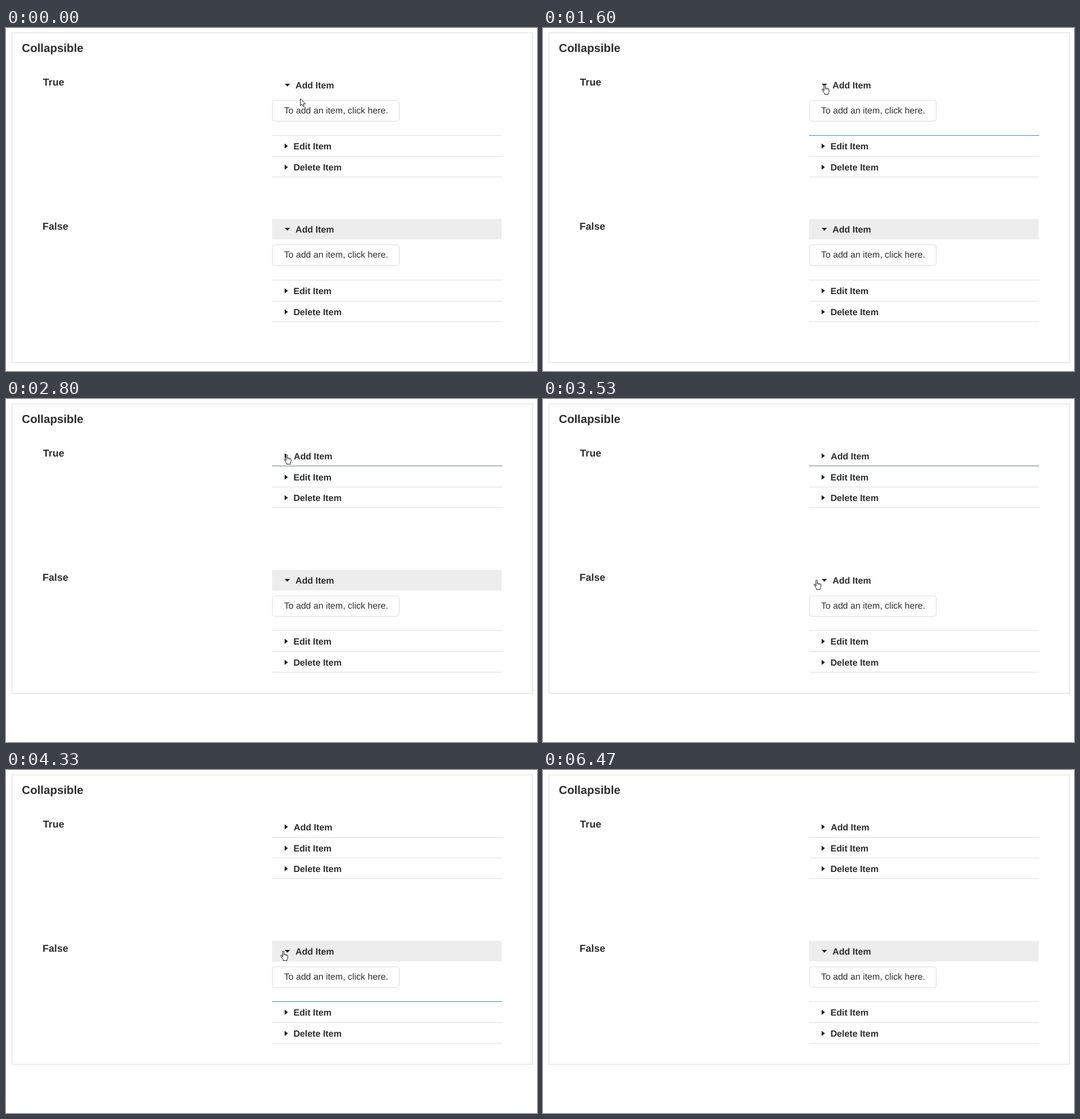
These frames come from a looping animation (930x602 px, 6540 ms). An HTML page:

```html
<!DOCTYPE html>
<html lang="en">
<head>
<meta charset="utf-8">
<title>Collapsible</title>
<style>
  html, body { margin: 0; width: 100%; height: 100%; overflow: hidden; background: #fff; }
  svg { display: block; }
  text { font: 700 15.8px "Liberation Sans", Arial, sans-serif; fill: #2c2c2c; text-rendering: geometricPrecision; }
  .title { font-size: 20.2px; }
  .label { font-size: 17.6px; }
  .note { font-weight: 400; font-size: 15.7px; fill: #303030; }
  .box { fill: #fff; stroke: #dcdcdc; }
  .line { fill: #dedede; }
  .cursor { fill: #fff; stroke: #1c1c1c; stroke-linejoin: round; stroke-linecap: round; }
</style>
</head>
<body>
<svg id="stage" width="930" height="602" viewBox="0 0 930 602"></svg>
<script>
const LOOP = 6540, TICK = 200 / 3, FOLD = 70.7;
const CLICK_TOP = 1600, CLICK_LOW = 4200, BLUR = 6466, EXIT = 5590;
const BLUE = '#3c8bc2', GREY = '#dedede';
const DOWN = 'M488 97.8H497.6L492.8 102.8Z';
const RIGHT = 'M488 95.2L493.8 99.7L488 104.2Z';
const stage = document.getElementById('stage');

function add(parent, tag, attrs, text) {
  const el = document.createElementNS('http://www.w3.org/2000/svg', tag);
  for (const key in attrs) el.setAttribute(key, attrs[key]);
  if (text) el.textContent = text;
  return parent.appendChild(el);
}

const set = (el, key, value) => el.setAttribute(key, value);
const moveTo = (el, x, y) => set(el, 'transform', `translate(${x} ${y})`);

// Piecewise linear value of column col in rows that start with a time.
function track(keys, t, col = 1) {
  if (t <= keys[0][0]) return keys[0][col];
  for (let i = 1; i < keys.length; i++) {
    const a = keys[i - 1], b = keys[i];
    if (t <= b[0]) return a[col] + (b[col] - a[col]) * (t - a[0]) / (b[0] - a[0]);
  }
  return keys[keys.length - 1][col];
}

const card = add(stage, 'rect', { x: 10.5, y: 8.5, width: 912, height: 579, class: 'box' });
add(stage, 'text', { x: 27.8, y: 42, class: 'title' }, 'Collapsible');
add(stage, 'text', { x: 64.8, y: 101, class: 'label' }, 'True');
const lowLabel = add(stage, 'text', { x: 64, y: 354, class: 'label' }, 'False');

const clip = add(add(stage, 'clipPath', { id: 'fold' }), 'rect', { x: 460, y: 118, width: 420, height: 70 });

// Positions inside a panel are those of the upper one.
function makePanel(clipped) {
  const head = add(stage, 'g', {});
  const bg = add(head, 'rect', { x: 466, y: 82, width: 402, height: 36, fill: '#fff' });
  const icon = add(head, 'path', { d: DOWN, fill: '#222' });
  const name = add(head, 'text', { x: 507, y: 105.6 }, 'Add Item');
  const wrap = add(stage, 'g', clipped ? { 'clip-path': 'url(#fold)' } : {});
  const body = add(wrap, 'g', {});
  add(body, 'rect', { x: 466.5, y: 127.5, width: 222, height: 36, rx: 4, class: 'box' });
  add(body, 'text', { x: 487, y: 150, class: 'note' }, 'To add an item, click here.');
  const rows = ['Edit Item', 'Delete Item'].map((text, i) => {
    const g = add(stage, 'g', {});
    add(g, 'path', { d: RIGHT, fill: '#222', transform: `translate(0 ${107.5 + 37 * i})` });
    add(g, 'text', { x: 503.4, y: 213 + 37 * i }, text);
    return g;
  });
  const lines = [188, 225, 261].map(y =>
    add(stage, 'rect', { x: 466, y, width: 403, height: 1, class: 'line' }));
  return { head, bg, icon, name, body, rows, lines };
}

const top1 = makePanel(true), low = makePanel(false);

const arrow = add(stage, 'path', {
  class: 'cursor', d: 'M0 0V12.2L2.8 9.6L4.9 14L6.8 13.1L4.9 8.9H8.7Z'
});
const hand = add(stage, 'g', { class: 'cursor' });
add(hand, 'path', {
  d: 'M3.9 11V1.9a1.2 1.2 0 0 1 2.4 0V7q.2-1 1.2-.9t1.2 1.2q.3-.7 1.2-.6t1.1 1.2' +
     'q.3-.6 1-.4t.9 1.2V12q0 2-1.3 3.2V17.4H5V15.6Q3.6 14.2 2.6 12.4L.8 9.6q-.5-1 .3-1.5t1.7.4Z'
});
add(hand, 'path', { d: 'M6.3 7v2M8.7 7.3v1.8M11 7.9v1.4', fill: 'none', 'stroke-width': .7 });

// Time, x and y of the pointer's hot spot.
const pointer = [
  [0, 515.5, 124.3], [467, 500, 102], [600, 500, 102], [733, 497, 102],
  [800, 497, 102], [1000, 493, 100], [2733, 493, 100], [2867, 490, 96],
  [3333, 478, 322], [3400, 478, 322], [3533, 479, 318], [3600, 479, 318],
  [4067, 485.5, 318], [5066, 485.5, 318], [5133, 466, 319.5], [5533, 182, 584]
];
const flash = [[0, 0], [133, 1], [200, 1], [267, .55], [400, 0]];
const leave = [[5133, 0], [5267, 1]];

const shade = k => { const v = Math.round(255 - 18 * k); return `rgb(${v},${v},${v})`; };

function draw(ms) {
  const t = Math.floor((ms % LOOP + 3.4) / TICK) * TICK + .1;
  const p = Math.min(1, Math.max(0, (t - CLICK_TOP - .1) / 333));
  const fold = FOLD * (.5 - Math.cos(Math.PI * p) / 2);
  const half = fold / 2;
  const closed = t > CLICK_TOP + 50;

  set(card, 'height', Math.floor(587.3 - fold) - 8);
  set(clip, 'height', Math.max(0, 70 - fold));
  set(top1.icon, 'd', closed ? RIGHT : DOWN);
  set(top1.name, 'x', closed ? 504 : 507);
  set(top1.bg, 'fill', shade(track(flash, t - CLICK_TOP)));
  top1.rows.forEach((row, i) => moveTo(row, 0, Math.floor((i ? .3 : .9) - fold)));
  [188.9, 225.3, 261.3].forEach((y, i) => set(top1.lines[i], 'y', Math.floor(y - fold)));
  const focusTop = t >= CLICK_TOP && t < CLICK_LOW;
  if (focusTop && p > 0) set(top1.lines[0], 'y', p < 1 ? 188.5 - fold : 117);
  top1.lines[0].style.fill = focusTop ? (p < 1 ? BLUE : '#6e8082') : GREY;

  const x = track(pointer, t), y = track(pointer, t, 2);
  const overLow = x >= 465 && y >= 300 && y < 336;
  const overTop = y < (t < CLICK_TOP ? 119 : 191);

  const shift = Math.floor(.4 - half);
  moveTo(lowLabel, 0, shift);
  moveTo(low.head, 0, 253 + shift);
  moveTo(low.body, 0, 253 + shift);
  const lineShift = Math.floor(.3 - half);
  low.rows.forEach(row => moveTo(row, 0, 254 + lineShift));
  [442, 479, 515].forEach((v, i) => set(low.lines[i], 'y', v + lineShift));
  low.lines[0].style.fill = t >= CLICK_LOW && t < BLUR ? BLUE : GREY;
  const tint = overLow ? track(flash, t - CLICK_LOW) : t < 5000 ? 1 : track(leave, t);
  set(low.bg, 'fill', shade(tint));

  const pointing = overLow || overTop, shown = t < EXIT;
  hand.style.display = shown && pointing ? '' : 'none';
  arrow.style.display = shown && !pointing ? '' : 'none';
  moveTo(hand, x - 5, y - 1);
  moveTo(arrow, x, y);
}

function loop() {
  draw(performance.now());
  requestAnimationFrame(loop);
}
loop();
</script>
</body>
</html>
```
